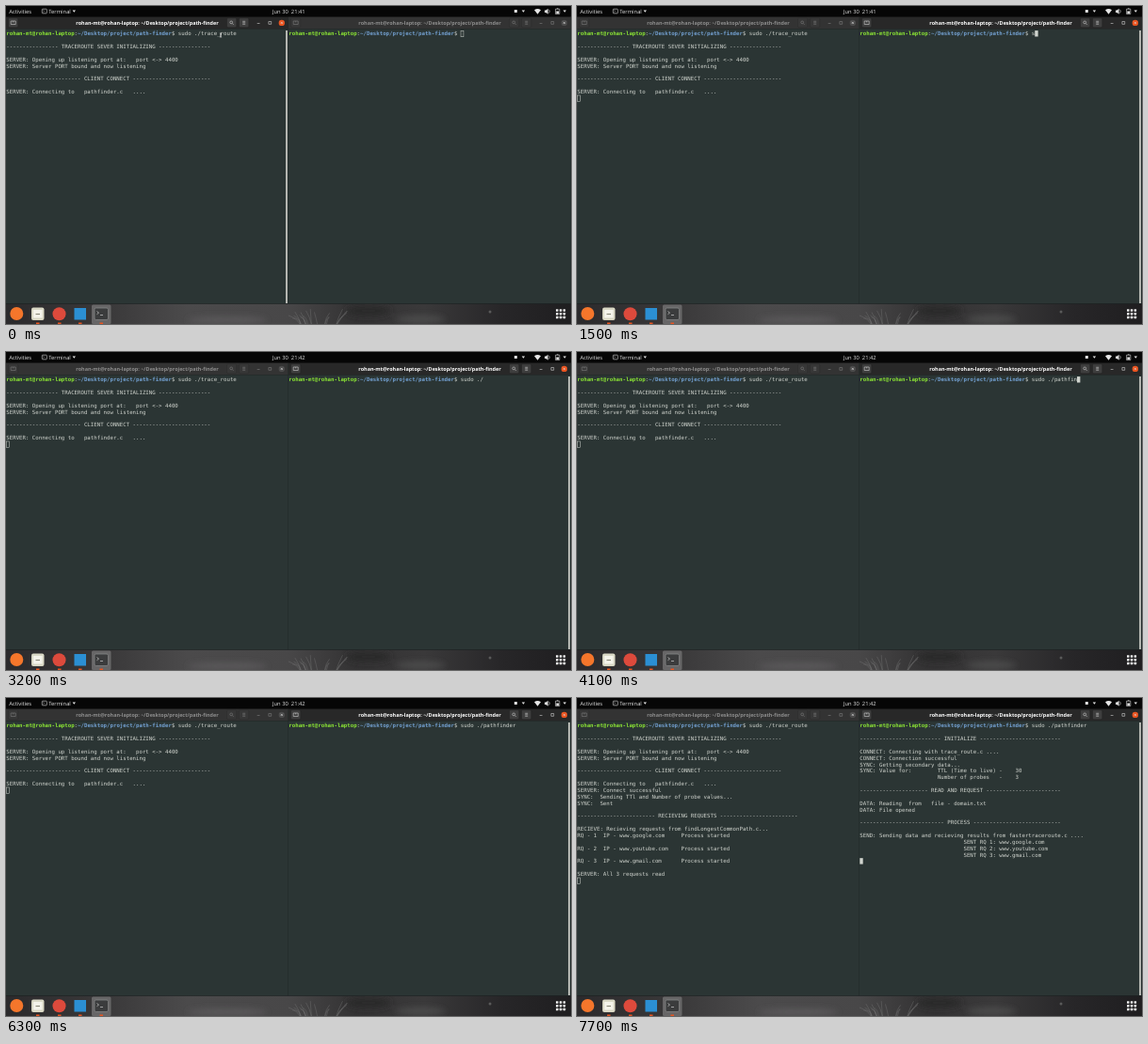
Animation of 600x338 px, one loop 8 s. Source, as an HTML page:

```html
<!DOCTYPE html>
<html lang="en">
<head>
<meta charset="utf-8">
<title>Two terminals</title>
<style>
  html, body { margin: 0; width: 600px; height: 338px; overflow: hidden; background: #000; }
  svg { display: block; }
  text { white-space: pre; text-rendering: geometricPrecision; }
  .mono { font: 5.72px "DejaVu Sans Mono", monospace; fill: #d0d4ce; }
  .user { font-weight: 700; fill: #8ae234; }
  .path { font-weight: 700; fill: #729fcf; }
  .ui { font: 5.8px "Open Sans", sans-serif; fill: #e4e4e4; }
  .title { font: 700 5.45px "Open Sans", sans-serif; text-anchor: middle; fill: #8d8d8d; }
  .bar { fill: #333; }
  .button { fill: #373737; stroke: #2c2c2c; stroke-width: .5; }
  .sign { fill: none; stroke: #7c7c7c; stroke-width: .6; }
  .close { fill: #4b4b4b; }
  .scroll { fill: none; }
  .active .title { fill: #fff; }
  .active .bar { fill: #282828; }
  .active .button { fill: #3e3e3e; stroke: #202020; }
  .active .sign { stroke: #d0d0d0; }
  .active .close { fill: #e95420; }
  .active .scroll { fill: #b4b6b1; }
</style>
</head>
<body>
<svg id="stage" width="600" height="338" viewBox="0 0 600 338">
  <defs>
    <linearGradient id="wall">
      <stop offset="0" stop-color="#2b2a2c"/>
      <stop offset=".18" stop-color="#3a393a"/>
      <stop offset=".32" stop-color="#4b4a4b"/>
      <stop offset=".5" stop-color="#484748"/>
      <stop offset=".62" stop-color="#333233"/>
      <stop offset=".74" stop-color="#3a393a"/>
      <stop offset=".88" stop-color="#272628"/>
      <stop offset="1" stop-color="#1f1e20"/>
    </linearGradient>
    <filter id="soft"><feGaussianBlur stdDeviation="3"/></filter>
    <clipPath id="strip"><rect y="316.500" width="600" height="21.500"/></clipPath>
  </defs>

  <!-- wallpaper and dock -->
  <g clip-path="url(#strip)">
    <rect y="316" width="600" height="22" fill="url(#wall)"/>
    <g filter="url(#soft)">
      <ellipse cx="235" cy="334" rx="42" ry="4" fill="#5a595a"/>
      <ellipse cx="385" cy="324" rx="24" ry="6" fill="#2a292a"/>
      <ellipse cx="440" cy="333" rx="26" ry="4" fill="#4c4b4c"/>
    </g>
    <g id="streaks" fill="none" stroke="#8a8a8a" stroke-width=".5" opacity=".6"></g>
    <circle cx="514" cy="325" r="1.500" fill="#5a5a5a"/>
  </g>
  <circle cx="11.300" cy="327" r="7" fill="#f5762b"/>
  <rect x="27" y="320.500" width="13.500" height="13.500" rx="2" fill="#d9d8c5"/>
  <path d="M29 323h9.500v8.500h-9.500z" fill="#f4f3ea"/>
  <path d="M31.500 327.500h4.500" stroke="#8d8c7d" stroke-width="1.200"/>
  <circle cx="56.500" cy="327.300" r="7" fill="#dd4a3c"/>
  <rect x="72.500" y="321" width="12.500" height="12.500" fill="#2b8fd3"/>
  <rect x="91" y="317.500" width="20.500" height="20.500" rx="1.500" fill="#676667"/>
  <rect x="94" y="321" width="14.500" height="12.500" rx="1.500" fill="#3b3c3d" stroke="#858686" stroke-width=".8"/>
  <path d="M96.500 324.500l2 1.600-2 1.600M100 328.500h3" class="sign" style="stroke:#e4e4e4"/>
  <path d="M32 337.200h3.500M55 337.200h3.500M77 337.200h3.500M99.500 337.200h3.500" stroke="#e95420" stroke-width="1.600"/>
  <g id="apps" fill="#efefef"></g>

  <!-- top panel -->
  <rect width="600" height="11.500" fill="#060606"/>
  <text class="ui" x="3.300" y="7.700">Activities</text>
  <rect x="38.300" y="3.200" width="5" height="4.600" rx=".6" class="sign" style="stroke:#ddd"/>
  <path d="M39.500 4.500l1 .9-1 .9" class="sign" style="stroke:#ddd;stroke-width:.5"/>
  <text class="ui" x="45.300" y="7.700">Terminal</text>
  <text class="ui" x="283" y="7.700" id="clock"></text>
  <g fill="#e6e6e6">
    <path d="M70.600 4.600h3.400l-1.700 2.200zM547.700 4.600h3.400l-1.700 2.200zM591.600 4.600h3.400l-1.700 2.200z"/>
    <rect x="539.800" y="4" width="3" height="3"/>
    <path d="M561 4.300q3.500-2.800 7 0l-3.500 4.500z"/>
    <path d="M572 4.500h1.500l2-1.800v6l-2-1.800h-1.500z"/>
    <path d="M576.500 3.800q1.600 1.900 0 3.800" class="sign" style="stroke:#e6e6e6"/>
    <path d="M584.300 5.500h2.800v2.400h-2.800z"/>
    <path d="M583.600 3.200h4.200v5.300h-4.200zM585 2.700h1.400" class="sign" style="stroke:#e6e6e6"/>
  </g>

  <g id="windows"></g>
  <g id="mouse" fill="none" stroke="#f2f2f2" stroke-width=".6">
    <path d="M-1.100-2.200Q0-2.200 0-1.700V1.700Q0 2.200-1.100 2.200M1.100-2.200Q0-2.200 0-1.700V1.700Q0 2.200 1.100 2.200"/>
  </g>
</svg>

<script>
const LOOP = 8000, CHAR = 3.443, ROW = 6.86, TOP = 26.1, PROMPT = 53;
const $ = id => document.getElementById(id);
const USER = "rohan-mt@rohan-laptop", DIR = "~/Desktop/project/path-finder";
const rule = (a, label, b) => "-".repeat(a) + " " + label + " " + "-".repeat(b);
const job = (n, site) => (`RQ - ${n}  IP - www.${site}.com`).padEnd(32) + "Process started";
const sent = (n, site) => " ".repeat(32) + `SENT RQ ${n}: www.${site}.com`;

// [time shown, row, text]
const serverLog = [
  [0, 2, rule(16, "TRACEROUTE SEVER INITIALIZING", 16)],
  [0, 4, "SERVER: Opening up listening port at:   port <-> 4400"],
  [0, 5, "SERVER: Server PORT bound and now listening"],
  [0, 7, rule(23, "CLIENT CONNECT", 24)],
  [0, 9, "SERVER: Connecting to   pathfinder.c   ...."],
  [6400, 10, "SERVER: Connect successful"],
  [6400, 11, "SYNC:  Sending TTl and Number of probe values..."],
  [6400, 12, "SYNC:  Sent"],
  [6500, 14, rule(24, "RECIEVING REQUESTS", 24)],
  [6500, 16, "RECIEVE: Recieving requests from findLongestCommonPath.c..."],
  [6600, 17, job(1, "google")],
  [6600, 19, job(2, "youtube")],
  [6600, 21, job(3, "gmail")],
  [6700, 23, "SERVER: All 3 requests read"]
];
const clientLog = [
  [6400, 2, rule(25, "INITIALIZE", 25)],
  [6400, 4, "CONNECT: Connecting with trace_route.c ...."],
  [6400, 5, "CONNECT: Connection successful"],
  [6400, 6, "SYNC: Getting secondary data..."],
  [6400, 7, "SYNC: Value for:        TTL (Time to live) -    30"],
  [6400, 8, " ".repeat(24) + "Number of probes   -    3"],
  [6500, 10, rule(21, "READ AND REQUEST", 23)],
  [6500, 12, "DATA: Reading  from   file - domain.txt"],
  [6500, 13, "DATA: File opened"],
  [6500, 15, rule(26, "PROCESS", 27)],
  [6500, 17, "SEND: Sending data and recieving results from fastertraceroute.c ...."],
  [6600, 18, sent(1, "google")],
  [6600, 19, sent(2, "youtube")],
  [6600, 20, sent(3, "gmail")]
];

const command = "sudo ./pathfinder";
const keys = [1500, 1800, 1900, 2000, 2200, 2400, 2600, 3300, 3400, 3500,
              3600, 3800, 3900, 4100, 4400, 4800, 5000];
const blinkOff = [[1100, 1500], [3200, 3300], [6300, 6400]];

const rand = (seed => () => (seed = seed * 16807 % 2147483647) / 2147483647)(77);
// blades of grass fanning out from the bottom edge
for (let i = 0; i < 18; i++) {
  const x = 312 + rand() * 40, lean = (x - 332) / 2 + rand() * 6 - 3;
  $("streaks").innerHTML += `<path d="M${x} 338q${lean / 4} ${-5 - rand() * 3} ${lean} ${-6 - rand() * 10}"/>`;
}
for (let i = 0; i < 9; i++)
  $("apps").innerHTML += `<rect x="${584 + i % 3 * 3.8}" y="${322.2 + (i / 3 | 0) * 3.8}" width="2.5" height="2.5" rx=".4"/>`;

const escape = s => s.replace(/&/g, "&amp;").replace(/</g, "&lt;").replace(/>/g, "&gt;");
const line = (row, markup, time = 0) =>
  `<text class="mono" x=".3" y="${TOP + row * ROW + 5.3}" data-time="${time}">${markup}</text>`;

function makeWindow(x, log, typed) {
  const g = document.createElementNS("http://www.w3.org/2000/svg", "g");
  const box = bx => `<rect class="button" x="${bx}" y="12.8" width="10.3" height="10" rx="1.3"/>`;
  g.setAttribute("transform", `translate(${x})`);
  g.innerHTML = `
    <rect class="bar" y="11.500" width="300" height="13"/>
    <rect y="24.300" width="300" height="292.200" fill="#2b3534"/>
    <path d="M299.500 12v304.500" stroke="#232a29" stroke-width=".6"/>
    ${box(2.500)}${box(234.500)}${box(247.500)}
    <path class="sign" d="M5.200 19.500v-3.500h5v3.500zM7.700 16v1.500"/>
    <circle class="sign" cx="239.200" cy="17.400" r="1.400"/>
    <path class="sign" d="M240.300 18.500l1.400 1.400M251.200 16.300h3M251.200 17.800h3M251.200 19.300h3
      M266.700 18.500h2.800M278.900 16.500h2.800v2.800h-2.800z"/>
    <circle class="close" cx="292.800" cy="17.900" r="3.200"/>
    <path d="M291.700 16.800l2.200 2.200M293.900 16.800l-2.200 2.200" stroke="#ddd" stroke-width=".6"/>
    <text class="title" x="150" y="19.700">${USER}: ${DIR}</text>
    ${line(0, `<tspan class="user">${USER}</tspan>:<tspan class="path">${DIR}</tspan>$ <tspan class="typed">${typed}</tspan>`)}
    ${log.map(([time, row, s]) => line(row, escape(s), time)).join("")}
    <rect class="scroll" x="297" y="26" width="2" height="290"/>
    <rect class="caret" width="3.400" height="6.400" stroke-width=".5"/>`;
  $("windows").append(g);
  return {
    g, typed: g.querySelector(".typed"), caret: g.querySelector(".caret"),
    lines: [...g.querySelectorAll("[data-time]")]
  };
}

const server = makeWindow(0, serverLog, "sudo ./trace_route");
const client = makeWindow(300, clientLog, "");

function place(win, col, row, solid, shown) {
  const c = win.caret, inset = solid ? 0 : .25;
  c.setAttribute("x", .3 + col * CHAR + inset);
  c.setAttribute("y", TOP + row * ROW + inset);
  c.setAttribute("width", 3.4 - inset * 2);
  c.setAttribute("fill", solid ? "#d0d4ce" : "none");
  c.setAttribute("stroke", solid ? "none" : "#d0d4ce");
  c.style.display = shown ? "" : "none";
}

function draw(now) {
  const t = Math.floor(now % LOOP / 100) * 100;
  const clientOn = t >= 600, serverOn = t < 800;
  server.g.classList.toggle("active", serverOn);
  client.g.classList.toggle("active", clientOn);
  // the scrollbar hides before the title bar fades
  server.g.querySelector(".scroll").style.display = clientOn ? "none" : "";

  for (const win of [server, client])
    for (const el of win.lines) el.style.display = t >= +el.dataset.time ? "" : "none";

  const count = keys.filter(k => k <= t).length;
  client.typed.textContent = command.slice(0, count);
  const space = t >= 5300 && t < 5700 ? 1 : 0;
  const lit = !blinkOff.some(([a, b]) => t >= a && t < b);
  const done = t >= 6400;
  const last = log => log.reduce((r, [time, row]) => t >= time ? Math.max(r, row) : r, 0) + 1;
  place(client, done ? 0 : PROMPT + count + space, done ? last(clientLog) : 0, clientOn, lit);
  place(server, 0, last(serverLog), !clientOn, t >= 300);

  const move = Math.min(1, Math.max(0, (t - 100) / 500));
  const ease = move * move * (3 - 2 * move);
  $("mouse").setAttribute("transform", `translate(${228 + 233.5 * ease} ${31 + 68 * ease})`);
  $("mouse").style.display = t < 1500 ? "" : "none";
  $("clock").textContent = t < 3000 ? "Jun 30  21:41" : "Jun 30  21:42";
}

const start = performance.now();
function tick() {
  draw(performance.now() - start);
  requestAnimationFrame(tick);
}
tick();
</script>
</body>
</html>
```
